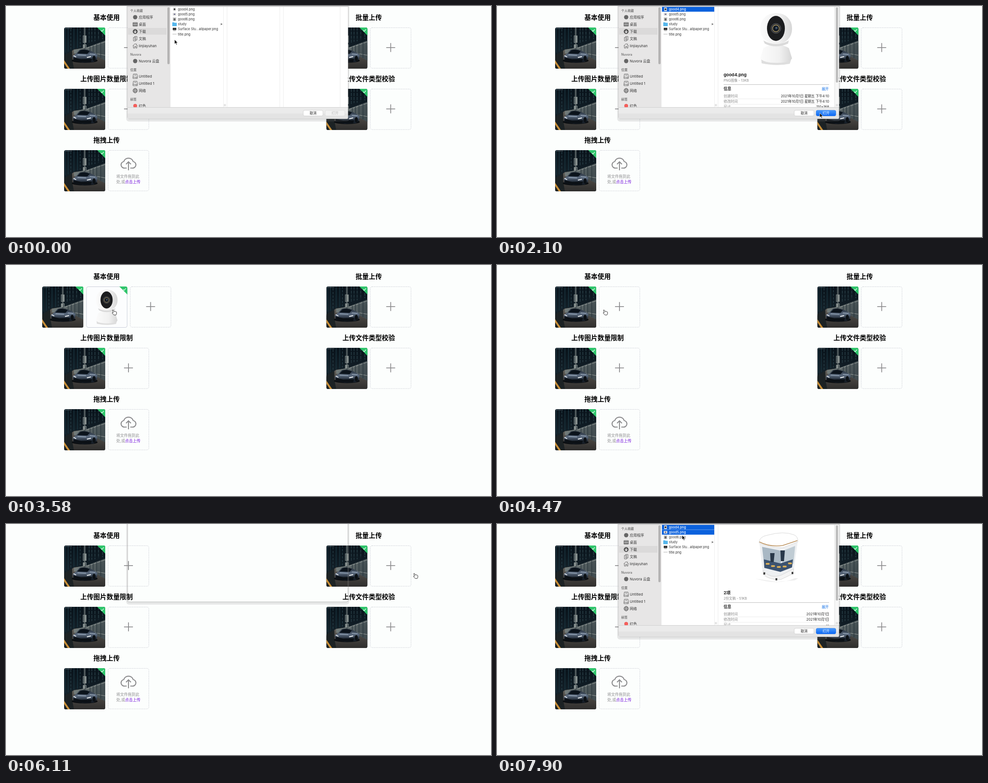
Recreate the animation shown at these times as an HTML page. Size 1085 px wide and 516 px high, loop 8 s.

```html
<!DOCTYPE html>
<html lang="zh-CN">
<head>
<meta charset="utf-8">
<title>Upload demo</title>
<style>
html, body { margin: 0; width: 100%; height: 100%; overflow: hidden; background: #fcfefd; }
svg { display: block; }
#stage { width: 100vw; height: 100vh; font-family: Inter, "Noto Sans CJK SC", "Noto Sans CJK", "Noto Sans", sans-serif; }
</style>
</head>
<body>
<svg id="stage" viewBox="0 0 1085 516">
<defs>
  <linearGradient id="night" x2="0" y2="1">
    <stop offset="0" stop-color="#08121a"/><stop offset=".6" stop-color="#142129"/>
  </linearGradient>
  <linearGradient id="road" x2="0" y2="1">
    <stop offset="0" stop-color="#77736c"/><stop offset=".5" stop-color="#494642"/><stop offset="1" stop-color="#2f2e2d"/>
  </linearGradient>
  <linearGradient id="mesh" x2="1" y2=".3">
    <stop offset="0" stop-color="#7c8583"/><stop offset="1" stop-color="#414c50"/>
  </linearGradient>
  <linearGradient id="paint" x2="0" y2="1">
    <stop offset="0" stop-color="#1a232e"/><stop offset=".45" stop-color="#5c6b7f"/><stop offset=".8" stop-color="#18202a"/>
  </linearGradient>
  <linearGradient id="blue" x2="0" y2="1"><stop stop-color="#4b9cfc"/><stop offset="1" stop-color="#0a66f5"/></linearGradient>
  <linearGradient id="shell"><stop stop-color="#fbfbfb"/><stop offset=".6" stop-color="#f1f1f1"/><stop offset="1" stop-color="#d6d6d6"/></linearGradient>
  <linearGradient id="bar" x2="0" y2="1"><stop offset=".5" stop-color="#ebebeb"/><stop offset=".6" stop-color="#e3e3e3"/></linearGradient>
  <clipPath id="round"><rect width="92" height="92" rx="4"/></clipPath>

  <g id="done">
    <path d="M74 0H88Q92 0 92 4V18Z" fill="#2fc56b"/>
    <path d="M82.500 6.500l2.200 2.200 4-4.500" fill="none" stroke="#fff" stroke-width="1.100"/>
  </g>
  <g id="photo">
    <g clip-path="url(#round)" fill="none">
      <path d="M0 0H92V92H0Z" fill="url(#night)"/>
      <path d="M3 0V56M9 0V54M22 0V48M30 0V46" stroke="#18303a" stroke-width="1.800"/>
      <path d="M15 4V50M36 0V44" stroke="#2b444c" stroke-width="1.200" stroke-dasharray="5 3"/>
      <path d="M56 0V34M62 0V32M69 0V31M77 0V28M86 14V26" stroke="#22353d" stroke-width="2.200" stroke-dasharray="7 2"/>
      <path d="M0 65L22 49L92 40V92H0Z" fill="url(#road)"/>
      <path d="M22 50L52 44L92 29V74L68 62L22 58Z" fill="url(#mesh)"/>
      <path d="M51 46L92 32M53 55L92 62" stroke="#a5aba6" stroke-width=".9"/>
      <path d="M58 43V58M65 40V61M73 37V64M82 33V68" stroke="#27343a" stroke-width="1.300"/>
      <path d="M46 0V50" stroke="#4b5558" stroke-width="4"/>
      <path d="M46 18V34M46 38V46" stroke="#848d8c" stroke-width="8"/>
      <path d="M44 19V33M48 39V46" stroke="#29353b" stroke-width="1.500"/>
      <path d="M0 62L18 52V70L22 92H0Z" fill="#1c2224"/>
      <path d="M0 73L13 92H8L0 80Z" fill="#c98f38"/>
      <ellipse cx="46" cy="74" rx="29" ry="5" fill="#0b0e11"/>
      <path d="M19 64L27 58L35 50Q46 47 59 52L67 56L74 60V70L66 77L41 78L21 73Z" fill="url(#paint)"/>
      <path d="M29 58L37 51Q47 48 57 53L52 59Z" fill="#0b131b"/>
      <path d="M21 67L38 71L62 70L60 77H38L22 73Z" fill="#0b1015"/>
      <path d="M30 61L49 62M57 59L70 60" stroke="#9babbc" stroke-width="1.300"/>
      <path d="M21 63l6 3M51 67l9-2" stroke="#f3f6f8" stroke-width="1.900"/>
      <ellipse cx="67" cy="69" rx="3.500" ry="6" fill="#0b1015"/>
      <path d="M2 2h16" stroke="#84949a" stroke-width=".7"/>
    </g>
    <use href="#done"/>
  </g>
  <g id="frame"><rect x=".5" y=".5" width="91" height="90.500" rx="4" fill="none" stroke="#c7c9d2" stroke-dasharray="2.200 1.600" stroke-width=".9"/></g>
  <g id="add"><use href="#frame"/><path d="M36 44.800H56M46 34.800V54.800" stroke="#8c8c8e" stroke-width="1.800"/></g>
  <g id="camera">
    <path d="M3 101Q39 116 71 101L67 113Q38 119 4 112Z" fill="#dedede"/>
    <path d="M8 78Q36 62 65 78L72 101Q66 111 37 111Q8 111 1 101Z" fill="url(#shell)"/>
    <rect x="1" width="71" height="69" rx="33" fill="url(#shell)"/>
    <path d="M8 61Q36 77 65 61L63 68Q36 80 11 68Z" fill="#dadada"/>
    <ellipse cx="36" cy="34" rx="20" ry="28" fill="#1b1c1e"/>
    <circle cx="36" cy="34" r="11" fill="#303338" stroke="#626264"/>
    <circle cx="36" cy="34" r="7.500" fill="#111923" stroke="#b39b61" stroke-width="1.300"/>
    <circle cx="37" cy="33" r="2.500" fill="#46576b"/>
  </g>
  <g id="spa">
    <path d="M-8 102Q44 118 80 101H88L80 106L40 109Z" fill="#eee"/>
    <path d="M1 22L8 85Q27 104 51 98L78 82L87 17Z" fill="#eef0f2"/>
    <path d="M7 31L51 40L48 77L11 66Z" fill="#a9b8c4"/>
    <path d="M53 40L81 29L77 69L51 78Z" fill="#c0ccd4"/>
    <path d="M11 59L48 68L76 59L74 77L48 87L12 78Z" fill="#3c5370"/>
    <path d="M25 45h10l-2 20h-7zM48 39h10l-2 24h-7z" fill="#293849"/>
    <path d="M17 69h5M29 74h5M42 76h5M55 75h5M67 68h5" stroke="#d7ad58" stroke-width="4" stroke-linecap="round"/>
    <path d="M0 22Q1 8 19 5Q55-5 78 4Q88 8 87 20L53 33Q21 33 0 22Z" fill="#fff" stroke="#d7d7d7"/>
    <path d="M1 20Q25 32 53 28L86 17" fill="none" stroke="#b78b55" stroke-width="1.600"/>
    <path d="M9 84Q26 103 50 94L78 80L76 91L49 104Q22 105 10 93Z" fill="#f4f4f4" stroke="#d4d4d4"/>
    <path d="M12 88v5M39 101v5M75 87v5" stroke="#444" stroke-width="4"/>
  </g>
  <path id="arrow" d="M0 0V10L2.400 7.800L4 11.800L5.700 11.100L4.100 7.200H7.300Z" fill="#111" stroke="#fff" stroke-width=".7"/>
  <path id="hand" d="M.2-.2Q1.500-1.500 2.500.2L3.900 3.100L5 2.300L6 3.100L7.200 2.500L8 3.500Q9.300 3.400 9.300 5.100V8.100L8 10.700H3.400L-.2 6.600Q-.7 5 .8 5.300L1.900 5.700Z" fill="#fff" stroke="#222" stroke-width=".95"/>
</defs>
<g id="page"></g>
<g id="shadow" fill-rule="evenodd">
  <path d="M269-90H768V251Q768 258 761 258H276Q269 258 269 251ZM272-90V249Q272 252 275 252H762Q765 252 765 249V-90Z" fill="#777" fill-opacity=".17"/>
  <path d="M272-90V249Q272 252 275 252H762Q765 252 765 249V-90" fill="none" stroke="#888" stroke-opacity=".55"/>
</g>
<g id="dialog"></g>
<use id="cursor"/>
</svg>
<script>
const $ = id => document.getElementById(id);
const use = (id, x, y, extra = '') => `<use href="#${id}" transform="translate(${x} ${y})" ${extra}/>`;
const rect = (x, y, w, h, fill, extra = '') => `<rect x="${x}" y="${y}" width="${w}" height="${h}" fill="${fill}" ${extra}/>`;
const line = (d, color = '#dedede', w = 1) => `<path d="${d}" fill="none" stroke="${color}" stroke-width="${w}"/>`;
// y is the vertical middle of the glyphs
const text = (x, y, s, size = 7.6, fill = '#333', extra = '') =>
  `<text x="${x}" y="${y + size * .37}" font-size="${size}" fill="${fill}" ${extra}>${s}</text>`;
const bold = 'font-weight="700"', mid = 'text-anchor="middle"', end = 'text-anchor="end"';

const title = (x, y, s) => text(x, y, s, 14.7, '#000', `${bold} ${mid}`);
const pair = (x, y) => use('photo', x, y) + use('add', x + 98, y);

$('page').innerHTML =
  title(225, 25.5, '基本使用') + title(811.5, 25.5, '批量上传') +
  title(225, 162.5, '上传图片数量限制') + title(811.5, 162.5, '上传文件类型校验') +
  title(225, 300, '拖拽上传') +
  use('photo', 0, 48, 'id="first"') + use('add', 0, 48, 'id="more"') +
  `<g id="extra" transform="translate(179.500 48)">
    <rect x=".5" y=".5" width="91" height="91" rx="4" fill="#fcfdfe" stroke="#c9ccd8"/>
    <g id="spinner"></g>
    <g id="loaded"><use href="#camera" transform="translate(21 7) scale(.68)"/><use href="#done"/></g>
  </g>` +
  pair(716.6, 48) + pair(130, 185) + pair(716.6, 185) +
  use('photo', 130, 322) + use('frame', 228, 322) +
  line('M270 362H266A7.300 7.300 0 0 1 263.500 347.500A11 11 0 0 1 284.500 347.500A7.300 7.300 0 0 1 282 362H278M274 367V348M268.500 353.500L274 348L279.500 353.500', '#8c8c8e', 2.2) +
  text(246.7, 380.5, '将文件拖到此', 8.6, '#8e8e90') +
  text(246.7, 393, '处,或<tspan fill="#7211dc">点击上传</tspan>', 8.6, '#8e8e90');

$('spinner').innerHTML = Array.from({ length: 8 }, (_, i) => {
  const a = (30 - i * 36) * Math.PI / 180;
  return `<circle cx="${8 * Math.cos(a)}" cy="${8 * Math.sin(a)}" r="${1.65 - i * .15}" fill="#8c8c92"/>`;
}).join('');

const side = (y, s, icon) => text(297, y, s, 8, '#333') +
  `<g transform="translate(289 ${y})" fill="none" stroke="#555" stroke-width=".9">${icon}</g>`;
const group = (y, s) => text(278, y, s, 7, '#747474', 'font-weight="600"');
const dot = '<circle r="4.800" fill="#666" stroke="none"/>';
const disk = '<path d="M-4-5H4L5 2V5H-5V2ZM-5 2H5M-2-2.500H2M1.500 3.700H3"/>';

const sidebar = rect(272, 0, 96, 226, '#e7e6e6') + rect(273, 49, 86, 15, '#dbdada') +
  rect(361, 3, 5, 127, '#b5b4b4', 'rx="2.500"') +
  group(10.5, '个人收藏') + side(25, '应用程序', dot) +
  side(41, '桌面', '<path d="M-5-4H5V4H-5ZM-5-1.500H5M-5 2.500H5" fill="#aaa"/>') +
  side(57, '下载', '<circle r="5" fill="#555"/><path d="M0-3V2.500M-2.500 0L0 2.800L2.500 0" stroke="#fff" stroke-width="1.300"/>') +
  side(73, '文稿', '<path d="M-4-3H1V5H-4ZM-1-3V-5H4V3H1M-2 0H0M-2 2H0"/>') +
  side(89, 'linjiayuhan', '<path d="M-5.500 0L0-5L5.500 0M-4-1V5H-1V1H1.500V5H4V-1M3-3V-5"/>') +
  group(108.5, 'Nuvora') + side(123, 'Nuvora 云盘', dot) +
  group(142.5, '位置') + side(157, 'Untitled', disk) + side(173, 'Untitled 1', disk) +
  side(189, '网络', '<circle r="5"/><ellipse rx="2.300" ry="5"/><path d="M-5 0H5M-4-2.500H4M-4 2.500H4"/>') +
  group(208.5, '标签') + side(223, '红色', '<circle r="4" fill="#f65f5b" stroke="#e44b49" stroke-width=".6"/>');

const icons = [
  rect(-3, -4, 6, 8, '#ddd') + '<circle r="2" fill="#333"/>',
  rect(-4, -3, 8, 6, '#ddd') + '<circle r="1.600" fill="#668"/>',
  rect(-4, -4, 8, 8, '#ccc') + rect(-2, -2, 4, 5, '#666'),
  '<path d="M-5-4H-1L0-3H5V4.500H-5Z" fill="#55b6ec"/>',
  rect(-4, -3, 8, 5, '#333') + rect(-3, 3, 6, 1, '#888'),
  rect(-4.5, -.8, 9, 1.6, '#ccc')
];
const files = ['good4.png', 'good5.png', 'good6.png', 'study', 'Surface Stu...allpaper.png', 'title.png'];
const list = files.map((name, i) => {
  const y = 7.3 + i * 11.1;
  return `<g id="row${i}">` + rect(369, y - 5.3, 117, 10.7, '#0b61dd', 'class="mark"') +
    `<g transform="translate(377 ${y})">${icons[i]}</g>` + text(384.5, y, name, 7.35, '#333') + '</g>';
}).join('') + '<path d="M480.500 38.300L484.500 40.600L480.500 42.900Z" fill="#777"/>';

const field = (y, key, id) => text(507, y, key, 7.9, '#888') + text(743, y, '', 7.6, '#222', `${end} id="${id}"`);
const preview = `<g id="preview">` + rect(495, 2, 260, 224, '#fff') + rect(755, 2, 10, 224, '#f7f7f7') +
  line('M755.500 2V226') + rect(758, 3, 5, 168, '#bcbcbc', 'rx="2.500"') + line('M759 219V224M761.500 219V224', '#aaa', .7) +
  use('camera', 588, 16, 'id="shot1"') + use('spa', 586, 20, 'id="shot2"') +
  text(507, 153, '', 9.6, '#222', `${bold} id="name"`) + text(507, 166, '', 7.5, '#888', 'id="kind"') +
  line('M507 175.500H743', '#bdbdbd') + text(507, 185, '信息', 8.6, '#222', bold) +
  text(742, 185, '展开', 7.8, '#0869e5', end) +
  field(201, '创建时间', 'made') + line('M507 207.500H743M507 219.500H743', '#e2e2e2', .7) +
  field(213.3, '修改时间', 'edited') + field(225.5, '尺寸', 'size') + '</g>';

const button = (x, s, id) => rect(x, 233, 44, 12.5, '#fff', `rx="3" stroke="#c8c8c8" stroke-width=".7" id="${id}Box"`) +
  text(x + 22, 239.3, s, 7.8, '#222', `${mid} id="${id}"`);

$('dialog').innerHTML = rect(272, -10, 493, 262, '#fff', 'rx="3"') + sidebar + list +
  line('M486.500 2V226M494.500 2V226M612.500 2V226M620.500 2V226M747.500 2V226', '#e8e8e8', .8) +
  line('M488.500 219V224M491 219V224', '#aaa', .7) + preview +
  rect(272, 0, 493, 2, '#d2d2d2') +
  `<path d="M272 226H765V249Q765 252 762 252H275Q272 252 272 249Z" fill="url(#bar)"/>` +
  line('M272 226.500H765', '#cfcfcf') + button(665, '取消', 'cancel') + button(714, '打开', 'open');

const show = (id, on) => $(id).style.display = on ? '' : 'none';
const between = (n, a, b) => n >= a && n < b;

// Pointer stops: step, x, y
const path = [
  [0, 377, 75], [2, 445, 35], [4, 412, 6], [6, 412, 6], [8, 520, 80], [11, 798, 274], [13, 722, 239],
  [15, 722, 239], [18, 341, 98], [20, 303, 97], [23, 238, 101], [30, 238, 101], [33, 1018, 130],
  [37, 856, 89], [38, 846, 84], [39, 846, 84], [41, 912, 111], [47, 414, 10], [51, 414, 11], [53, 414, 25], [54, 414, 25]
];
function pointer(n) {
  const i = path.findIndex(p => p[0] > n), [a, x, y] = path[i - 1], [b, u, v] = path[i], k = (n - a) / (b - a);
  return [x + (u - x) * k, y + (v - y) * k];
}

function draw(n) {
  const three = between(n, 17, 30), opened = n < 16 || n >= 42, sliding = n === 16 || n === 41;
  const picked = n >= 52 ? 2 : between(n, 6, 16) || n >= 49 ? 1 : 0;

  $('first').setAttribute('transform', `translate(${three ? 81 : 130} 48)`);
  $('more').setAttribute('transform', `translate(${three ? 277.5 : 228} 48)`);
  show('extra', three);
  show('spinner', n < 23);
  show('loaded', n >= 23);
  $('spinner').setAttribute('transform', `translate(46 45) rotate(${(n - 18) * 54})`);

  show('dialog', opened);
  show('shadow', opened || sliding);
  $('shadow').setAttribute('transform', `translate(0 ${sliding ? -78 : 0})`);

  files.forEach((_, i) => {
    const row = $('row' + i), on = i < picked;
    row.querySelector('.mark').style.display = on ? '' : 'none';
    row.querySelector('text').setAttribute('fill', on ? '#fff' : '#333');
    row.querySelector('text').setAttribute('font-weight', on ? 500 : 400);
  });
  show('preview', picked);
  show('shot1', picked === 1);
  show('shot2', picked === 2);
  const day = '2021年10月1日' + (picked === 2 ? '' : ' 星期五 下午4:10');
  $('name').textContent = picked === 2 ? '2项' : 'good4.png';
  $('kind').textContent = picked === 2 ? '2份文稿 - 51KB' : 'PNG图像 - 13KB';
  $('made').textContent = $('edited').textContent = day;
  $('size').textContent = picked === 2 ? '--' : '110×168';
  $('openBox').setAttribute('fill', picked ? 'url(#blue)' : '#f1f1f1');
  $('openBox').setAttribute('stroke', picked ? '#176ce5' : '#d8d8d8');
  $('open').setAttribute('fill', picked ? '#fff' : '#b8b8b8');

  const hand = between(n, 18, 31) || between(n, 37, 42);
  $('cursor').setAttribute('href', hand ? '#hand' : '#arrow');
  $('cursor').setAttribute('transform', `translate(${pointer(n)})`);
}

const STEP = 148.7, LOOP = 8000, start = performance.now();
function tick() {
  draw(Math.floor((performance.now() - start) % LOOP / STEP));
  requestAnimationFrame(tick);
}
tick();
</script>
</body>
</html>
```
